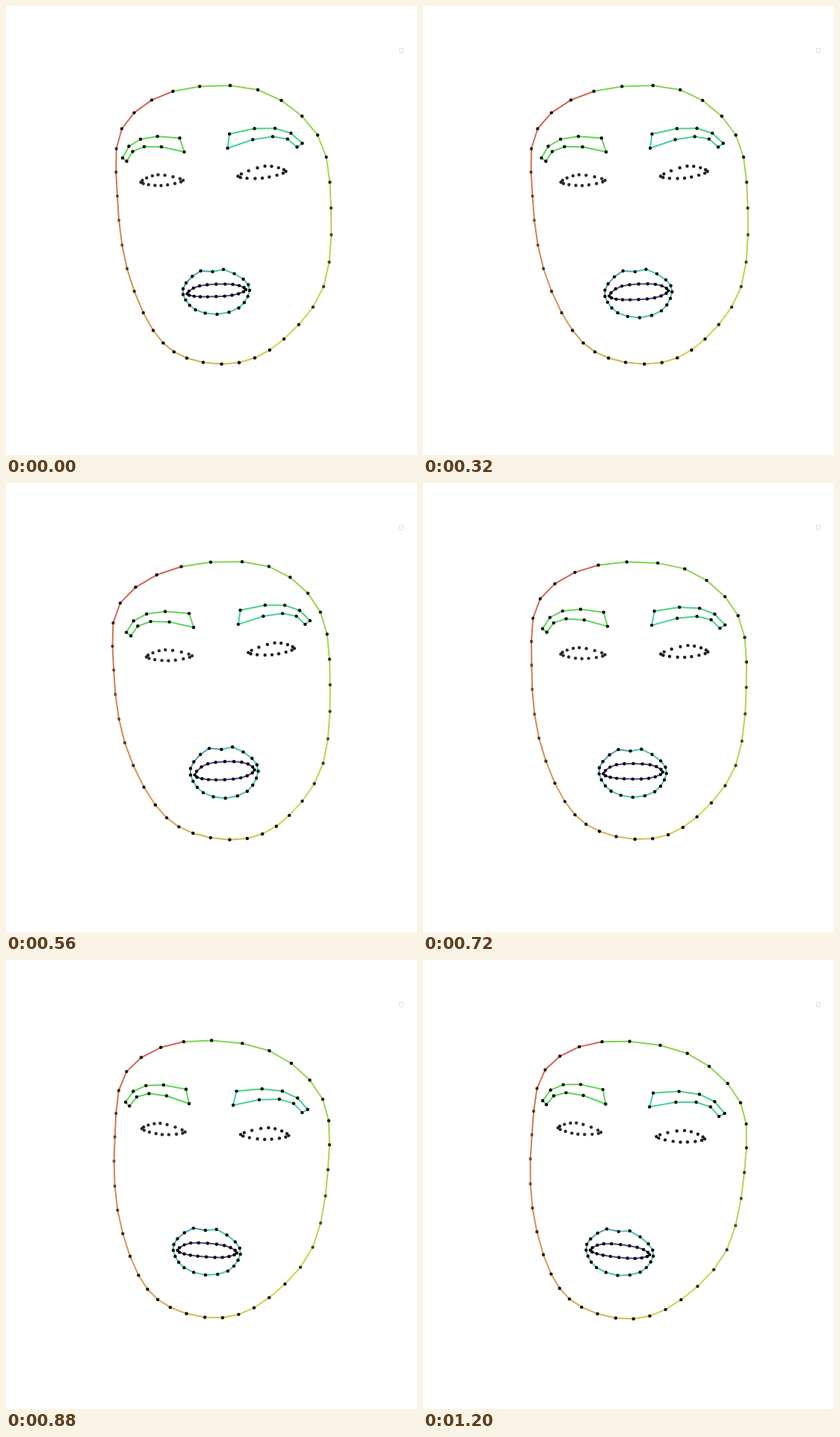
An HTML page with a canvas that plays this animation: 550 px wide and 600 px high, repeating every 1.28 s.

```html
<!DOCTYPE html>
<html lang="en">
<head>
<meta charset="utf-8">
<title>Face landmarks</title>
<style>
  html, body { margin: 0; width: 100%; height: 100%; overflow: hidden; background: #fff; }
  canvas { display: block; width: 550px; height: 600px; }
</style>
</head>
<body>
<canvas id="stage"></canvas>
<script>
const STEP = 80, STEPS = 16;

// Head pose: sideways turn in px, roll in radians, lift in px.
const times = [0, 2, 4, 7, 9, 11, 15];
const tracks = {
  yaw: [0, 1, 6, 11, 6, 2.5, 1],
  roll: [0, 0, 0, 0.016, 0.06, 0.122, 0.152],
  lift: [0, 0, 0, 1.8, 2.4, 1, 0]
};

// Cubic through (keys, vals); wraps around when a period is given.
function curve(keys, vals, x, period) {
  const n = keys.length;
  const at = j => {
    if (!period) j = Math.max(0, Math.min(n - 1, j));
    const k = (j + n) % n;
    return [keys[k] + (period || 0) * Math.floor(j / n), vals[k]];
  };
  let j = 0;
  while (j < n - 1 && keys[j + 1] <= x) j++;
  const [a, b, c, d] = [at(j - 1), at(j), at(j + 1), at(j + 2)];
  const span = c[0] - b[0];
  if (!span) return b[1];
  const u = (x - b[0]) / span, v = 1 - u;
  const m = span * (c[1] - a[1]) / (c[0] - a[0]);
  const w = span * (d[1] - b[1]) / (d[0] - b[0]);
  return b[1] * v * v * (1 + 2 * u) + m * u * v * v + c[1] * u * u * (3 - 2 * u) - w * u * u * v;
}

// Closed smooth outline of `count` dots through key points placed at `pins`.
function loop(count, pins, keys) {
  const xs = keys.map(p => p[0]), ys = keys.map(p => p[1]);
  return Array.from({ length: count }, (_, i) =>
    [curve(pins, xs, i, count), curve(pins, ys, i, count)]);
}

const every = (gap, count) => Array.from({ length: count / gap }, (_, i) => i * gap);

// Five dots on the parabola through a, b and c.
const arc = (a, b, c) => [0, 0.25, 0.5, 0.75, 1].map(t => [0, 1].map(k =>
  a[k] * (1 - t) * (1 - 2 * t) + b[k] * 4 * t * (1 - t) + c[k] * t * (2 * t - 1)));

const bump = (i, mid, width) => Math.exp(-(((i - mid) / width) ** 2));

const parts = [
  { // face outline
    rim: true,
    dots: loop(36, every(3, 36), [
      [223.5, 114], [337, 112], [417, 172.5], [435, 270], [425, 375], [372, 445],
      [312, 476.5], [242, 470.5], [197, 433.5], [162, 351], [149, 254], [155, 164]]),
    line: i => `hsl(${Math.max(7, 100 - i * 2.75)} 60% 58%)`,
    alpha: i => 0.98 - 0.5 * bump(i, 29, 3.5) - 0.36 * bump(i, 10.5, 3)
  },
  { // left brow
    dots: [...arc([156, 203], [180, 178], [232.5, 176.5]),
      ...arc([238.5, 195], [185, 188], [161.5, 207.5])],
    line: i => `hsl(${i < 5 ? 114 : 124} 60% 59%)`,
    alpha: () => 0.98
  },
  { // right brow
    dots: [...arc([299, 171], [360, 163.5], [396.5, 183.5]),
      ...arc([389.5, 188.5], [357, 174.5], [296.5, 190])],
    line: i => `hsl(${i < 5 ? 146 : 153} 60% 56%)`,
    alpha: () => 0.98
  },
  { // left eye
    dots: loop(16, every(4, 16), [[180.5, 235.5], [203.5, 225.5], [237, 233], [207.5, 240]]),
    alpha: () => 0.82
  },
  { // right eye
    dots: loop(16, every(4, 16), [[310.5, 227.5], [346.5, 214], [374.5, 221], [343, 230]]),
    alpha: () => 0.88
  },
  { // outer lips
    half: 29,
    dots: loop(20, [0, 2, 4, 5, 6, 8, 10, 13, 15, 17], [
      [237, 385.5], [241, 370], [260.5, 354], [276.5, 355], [291, 352],
      [317.5, 365], [326, 380], [311.5, 403.5], [282.5, 412], [253.5, 406]]),
    line: i => i < 5 ? 'hsl(196 38% 53%)' : 'hsl(162 56% 54%)',
    alpha: () => 1
  },
  { // inner lips
    half: 9,
    dots: loop(20, [0, 3, 7, 10, 13, 17], [
      [242.5, 384.5], [259, 374], [303.5, 372], [321, 379], [302.5, 386.5], [260, 388.5]]),
    line: () => 'hsl(256 36% 42%)',
    alpha: () => 1
  }
];

// Places one dot for a head pose: the middle of the face turns furthest,
// the rim bulges as the head rolls, and the mouth drops and opens.
function move([x, y], { rim, half }, { yaw, roll, lift }) {
  const u = (x - 300) / 100;
  const near = rim ? 1.3 - 0.75 * u * u : 1.25 - 0.4 * u * u;
  const sag = rim ? 0.22 * x * (1 - ((y - 330) / 215) ** 2) : 0;
  const jaw = half
    ? 0.35 * yaw + 30 * roll + 0.375 * yaw * (y - 381) / half
    : -lift;
  return [
    x + yaw * near - 0.85 * roll * (y - 232),
    y + roll * (x - 255 - sag) + jaw
  ];
}

const canvas = document.getElementById('stage');
const ctx = canvas.getContext('2d');
const ratio = window.devicePixelRatio || 1;
canvas.width = 550 * ratio;
canvas.height = 600 * ratio;
ctx.scale(ratio, ratio);

function drawPart(part, pose) {
  const dots = part.dots.map(p => move(p, part, pose));
  if (part.line) dots.forEach((p, i) => {
    ctx.strokeStyle = part.line(i);
    ctx.beginPath();
    ctx.moveTo(...p);
    ctx.lineTo(...dots[(i + 1) % dots.length]);
    ctx.stroke();
  });
  dots.forEach(([x, y], i) => {
    ctx.fillStyle = `rgba(0,0,0,${part.alpha(i)})`;
    ctx.beginPath();
    ctx.arc(x, y, 2.2, 0, Math.PI * 2);
    ctx.fill();
  });
}

function draw(step) {
  const pose = {};
  for (const name in tracks) pose[name] = curve(times, tracks[name], step);
  ctx.fillStyle = '#fff';
  ctx.fillRect(0, 0, 550, 600);
  ctx.lineWidth = 1;
  ctx.strokeStyle = '#dedede';
  ctx.beginPath();
  ctx.roundRect(526.5, 56.5, 5, 6, 1.2);
  ctx.stroke();
  ctx.lineWidth = 2;
  ctx.lineCap = 'round';
  parts.forEach(part => drawPart(part, pose));
}

const start = performance.now();
let shown = -1;
function tick() {
  const step = Math.floor((performance.now() - start) / STEP) % STEPS;
  if (step !== shown) draw(shown = step);
  requestAnimationFrame(tick);
}
tick();
</script>
</body>
</html>
```
